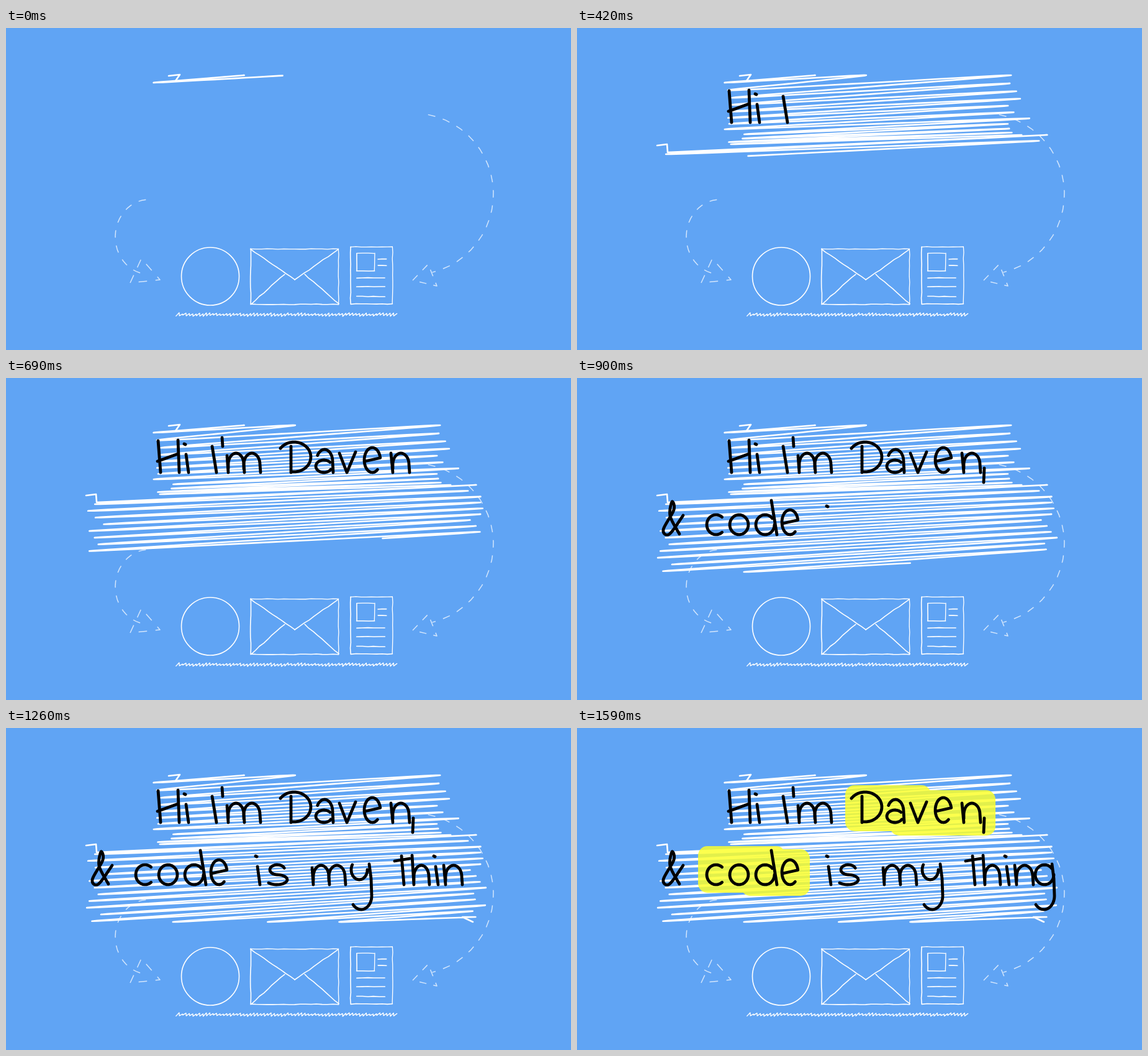
These frames come from a looping animation (910x518 px, 2.59 s). An HTML page with a canvas:

```html
<!DOCTYPE html>
<html lang="en">
<head>
<meta charset="utf-8">
<title>Hi I'm Daven</title>
<style>
  html, body { margin: 0; width: 100%; height: 100%; overflow: hidden; background: #60a4f4; }
  canvas { display: block; }
</style>
</head>
<body>
<canvas id="stage" width="910" height="518" role="img"
  aria-label="Hi I'm Daven, &amp; code is my thing"></canvas>
<script>
const LOOP = 2590, STEP = 30, LAST = 1590;
const ctx = document.getElementById('stage').getContext('2d');
const clamp = (v, lo = 0, hi = 1) => Math.max(lo, Math.min(hi, v));
const progress = (t, from, to) => clamp((t - from) / (to - from));
const range = (n, fn) => Array.from({ length: n }, (_, i) => fn(i));
const mix = (a, b, u) => [a[0] + (b[0] - a[0]) * u, a[1] + (b[1] - a[1]) * u];
const dist = (a, b) => Math.hypot(b[0] - a[0], b[1] - a[1]);
const lengthOf = pts => pts.reduce((s, p, i) => i ? s + dist(pts[i - 1], p) : 0, 0);

let seed = 2024;
const random = () => (seed = seed * 16807 % 2147483647) / 2147483647;
const around = (mid, spread) => mid + (random() * 2 - 1) * spread;

// Catmull-Rom curve through the points
function smooth(pts, n = 8) {
  const at = i => pts[clamp(i, 0, pts.length - 1)];
  const out = [pts[0]];
  for (let i = 0; i < pts.length - 1; i++) {
    const [a, b, c, d] = range(4, k => at(i + k - 1));
    for (let k = 1; k <= n; k++) {
      const u = k / n;
      out.push([0, 1].map(j => b[j] + u / 2 * (c[j] - a[j]
        + u * (2 * a[j] - 5 * b[j] + 4 * c[j] - d[j]
        + u * (3 * (b[j] - c[j]) + d[j] - a[j])))));
    }
  }
  return out;
}

// Elliptic arc, angles in degrees, clockwise when `to` is larger
const arc = (cx, cy, rx, ry, from, to) => range(25, i => {
  const a = (from + (to - from) * i / 24) * Math.PI / 180;
  return [cx + rx * Math.cos(a), cy + ry * Math.sin(a)];
});

function pen(color, width) {
  ctx.strokeStyle = color;
  ctx.lineWidth = width;
  ctx.lineCap = ctx.lineJoin = 'round';
}

// Strokes the first `len` pixels of a polyline
function trace(pts, len = Infinity) {
  if (len <= 0) return;
  ctx.beginPath();
  ctx.moveTo(...pts[0]);
  for (let i = 1; i < pts.length && len > 0; i++) {
    const d = dist(pts[i - 1], pts[i]);
    ctx.lineTo(...mix(pts[i - 1], pts[i], d > len ? len / d : 1));
    len -= d;
  }
  ctx.stroke();
}

// Zigzag patch: strokes run between two ragged edges and stay between top and bottom
function scribble({ hook, tail = [], left, right, leftY, rightY, spread, rows, ease, top, bottom }) {
  const edge = (x, [y1, y2], n) => range(n, k =>
    [around(x, spread), y1 + (y2 - y1) * (1 - (1 - k / (n - 1)) ** ease)]);
  const keep = (p, q) => mix(p, q, (clamp(p[1], top, bottom) - p[1]) / (q[1] - p[1]));
  const ls = edge(left, leftY, rows - 1), rs = edge(right, rightY, rows);
  const tips = rs.flatMap((r, k) => {
    const l = ls[k];
    return [keep(r, ls[Math.max(0, k - 1)]), ...(l ? [keep(l, r)] : [])];
  });
  // A midpoint in every stroke keeps it straight and rounds the turns
  const turns = tips.flatMap((p, i) => i ? [mix(tips[i - 1], p, .5), p] : [p]);
  const pts = [...hook, ...smooth(turns), ...tail];
  return { pts, len: lengthOf(pts) };
}

const upper = scribble({
  hook: [[262, 77], [280, 75], [273, 85]],
  left: 255, right: 711, spread: 18, rows: 13, ease: 1.4,
  leftY: [88, 187], rightY: [48, 172], top: 76, bottom: 190
});
const lower = scribble({
  hook: [[129, 189], [145, 187], [146, 200]], tail: [[735, 304], [752, 312]],
  left: 143, right: 759, spread: 15, rows: 15, ease: 1,
  leftY: [203, 343], rightY: [172, 304], top: 170, bottom: 312
});

// Handwriting parts: x from the letter's left edge, y from the baseline
const line = (x1, y1, x2, y2) => [[x1, y1], [x2, y2]];
const stem = (x, top, lean = 4) => line(x, top, x + lean, 0);
const arch = (x, w) => [[x, -6], ...arc(x + w / 2, -13, w / 2, 18, 180, 360), [x + w + 1, 0]];
const bowl = (from, to) => arc(17, -16, 15, 16, from, to);
const tail = x => [[x, -33], [x + 3, -10], ...arc(x - 13, 18, 17, 22, 0, 140)];

// Advance width, then the strokes in writing order
const glyphs = {
  H: [44, stem(2, -51), line(1, -18, 34, -30), stem(34, -52, 2)],
  i: [15, line(0, -46, 2, -45), stem(3, -29)],
  I: [16, stem(0, -42, 7)],
  "'": [7, line(0, -56, 1, -42)],
  m: [62, stem(1, -27, 2), arch(3, 25), arch(28, 26)],
  D: [50, stem(12, -42, 0), arc(17, -25, 27, 24, -145, 95)],
  a: [40, [...arc(16, -18, 13, 19, -150, 0), [30, 0]], arc(15, -10, 13, 10, -40, -330)],
  v: [37, [[0, -31], [12, 0], [26, -33]]],
  e: [45, [[4, -18], ...arc(16, -20, 13, 20, -10, -310)]],
  n: [32, stem(1, -31, 3), arch(4, 26)],
  ',': [8, line(5, -7, 4, 16)],
  '&': [41, smooth([[29, -1], [14, -30], [17, -53], [20, -40], [3, -8], [13, -1], [35, -31]])],
  c: [37, bowl(-50, -310)],
  o: [42, bowl(-80, -440)],
  d: [41, bowl(-40, -360), stem(27, -55, 9)],
  s: [45, [...arc(20, -24, 12, 8, -20, -270), ...arc(19, -8, 17, 8, -90, 140)]],
  y: [41, arc(15, -24, 13, 16, 210, 0), tail(31)],
  t: [29, stem(12, -46), line(1, -38, 25, -42)],
  h: [35, stem(0, -47, 3), arch(3, 24)],
  g: [35, bowl(-40, -360), tail(29)]
};
const SPACE = 30, LIFT = 14;

// Each part is written evenly between its two times
const lines = [
  { x: 243, y: 152, parts: [['Hi I', 210, 420], ["'m ", 420, 540], ['Daven,', 540, 720]] },
  { x: 136, y: 252, parts: [['& code ', 720, 890], ['is my thin', 890, 1260], ['g', 1260, 1320]] }
];

const letters = lines.flatMap(({ x, y, parts }) => parts.flatMap(([text, from, to]) => {
  const slot = (to - from) / text.replaceAll(' ', '').length;
  const out = [];
  for (const ch of text) {
    if (ch === ' ') { x += SPACE; continue; }
    const [width, ...shapes] = glyphs[ch];
    const strokes = shapes.map(shape => {
      const pts = shape.map(p => [p[0] + x, p[1] + y]);
      return { pts, len: lengthOf(pts) };
    });
    const total = strokes.reduce((s, k) => s + k.len + LIFT, -LIFT);
    out.push({ strokes, total, from, to: from + slot });
    from += slot;
    x += width;
  }
  return out;
}));

function drawText(t) {
  pen('#000', 4.8);
  for (const { strokes, total, from, to } of letters) {
    let ink = progress(t, from, to) * total;
    for (const { pts, len } of strokes) {
      trace(pts, ink);
      ink -= len + LIFT;
    }
  }
}

// Two overlapping marker bars, wiped in from the left
function highlight(a, b, u) {
  if (!u) return;
  ctx.save();
  ctx.beginPath();
  ctx.rect(a[0], 0, (b[0] + b[2] - a[0]) * u, 518);
  ctx.clip();
  ctx.fillStyle = 'rgba(252,255,44,.84)';
  ctx.beginPath();
  ctx.roundRect(...a, 15);
  ctx.roundRect(...b, 15);
  ctx.fill();
  ctx.restore();
}

// Dashed arc ending in a triangle of five dashes
function arrow(curve, head) {
  pen('rgba(255,255,255,.72)', 1.5);
  ctx.lineCap = 'butt';
  ctx.setLineDash([12, 12.7]);
  trace(curve);
  const loop = [...head, head[0]];
  ctx.setLineDash([lengthOf(loop) / 10]);
  trace(loop);
  ctx.setLineDash([]);
}

// Hand-drawn straight line
function rough(x1, y1, x2, y2, width = 1.6) {
  const n = Math.max(2, Math.round(Math.hypot(x2 - x1, y2 - y1) / 9));
  ctx.lineWidth = width;
  trace(range(n + 1, i => mix([x1, y1], [x2, y2], i / n).map(v => around(v, .5))));
}

function roughBox(l, t, r, b) {
  rough(l, t, r, t, 1.3);
  rough(r, t, r, b, 1.3);
  rough(r, b, l, b);
  rough(l, b, l, t);
}

function drawIcons() {
  seed = 71;
  pen('#fff', 1.6);
  ctx.beginPath();
  ctx.arc(329, 399.5, 46.5, 0, 7);
  ctx.stroke();

  roughBox(394, 355.5, 535.5, 444.5);
  rough(394, 356, 465, 405);
  rough(465, 405, 534, 357);
  rough(395, 444, 449, 396);
  rough(481, 396, 536, 444);

  roughBox(555, 352, 622.5, 444);
  roughBox(565, 362.5, 593.5, 391);
  for (const y of [371.5, 382]) rough(599, y, 613, y);
  for (const y of [402, 416, 432]) rough(565, y, 610, y);

  const wave = range(130, i => {
    const up = i % 2 ? 1 : -1;
    return [275 + i * 2.74 + up * 1.2, 461 - up * around(1.9, 1.1)];
  });
  ctx.lineWidth = 1.4;
  trace(wave);
}

function draw(t) {
  ctx.fillStyle = '#60a4f4';
  ctx.fillRect(0, 0, 910, 518);
  arrow(arc(230, 336, 54, 60, -95, -262), [[200, 410], [218, 371], [248, 405]]);
  arrow(arc(655, 267, 130, 130, -79, 76), [[655, 406], [680, 380], [694, 415]]);
  drawIcons();

  pen('#fff', 2.6);
  trace(upper.pts, upper.len * progress(t, -20, 395));
  trace(lower.pts, lower.len * (1 - (1 - progress(t, 357, 1048)) ** 1.6));

  highlight([432, 92, 138, 74], [504, 100, 170, 73], progress(t, 1320, 1460));
  highlight([195, 190, 141, 75], [264, 195, 111, 75], progress(t, 1455, 1590));
  drawText(t);
}

const start = performance.now();
function tick() {
  const t = (performance.now() - start) % LOOP;
  draw(Math.min(LAST, Math.floor(t / STEP) * STEP));
  requestAnimationFrame(tick);
}
tick();
</script>
</body>
</html>
```
